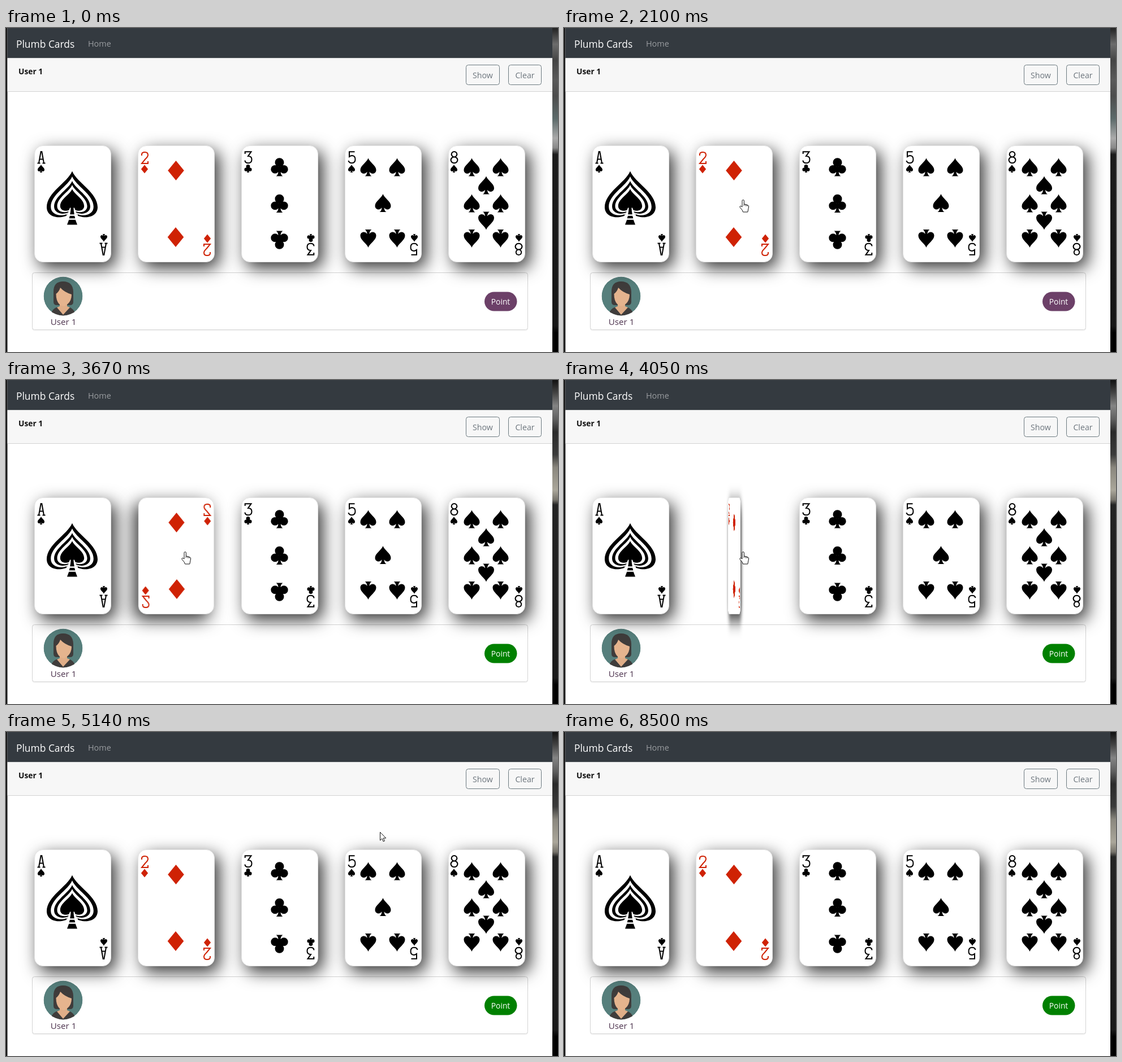
Write an HTML page that moves like this. It is 976x574 px and loops after 8.64 s.

```html
<!DOCTYPE html>
<html lang="en">
<head>
<meta charset="utf-8">
<title>Card estimates</title>
<style>
  html, body { margin: 0; width: 100%; height: 100%; overflow: hidden; background: #fff; }
  svg { position: absolute; left: 0; top: 0; overflow: visible; }
  #page, #pointer { width: 976px; height: 574px; }
  text { font-family: "Open Sans", "Noto Sans", sans-serif; }
  .card {
    position: absolute; top: 207.5px; width: 136px; height: 207px; box-sizing: border-box;
    border: 1.5px solid #e2e2e2; border-radius: 15px; background: #fff;
    box-shadow: 8px 10px 30px rgba(0, 0, 0, .8);
  }
  .card svg { left: -1px; top: -1.5px; width: 135px; height: 207px; }
  .rank { fill: none; stroke: currentColor; stroke-width: 2; }
  .outline { fill: none; stroke: #6c7a80; }
</style>
</head>
<body>
<svg id="page" viewBox="0 0 976 574">
  <defs>
    <linearGradient id="deskA" x2="0" y2="1">
      <stop offset="0" stop-color="#222"/><stop offset=".05" stop-color="#6c6c6c"/>
      <stop offset=".1" stop-color="#444"/><stop offset=".16" stop-color="#5a5a5a"/>
      <stop offset=".21" stop-color="#4c4c4c"/><stop offset=".28" stop-color="#5c6a6a"/>
      <stop offset=".34" stop-color="#aaa"/><stop offset=".37" stop-color="#888"/>
      <stop offset=".39" stop-color="#1c1c1c"/><stop offset=".92" stop-color="#161616"/>
      <stop offset=".94" stop-color="#000"/>
    </linearGradient>
    <linearGradient id="deskB" x2="0" y2="1">
      <stop offset="0" stop-color="#111"/><stop offset=".04" stop-color="#444"/>
      <stop offset=".08" stop-color="#848484"/><stop offset=".12" stop-color="#606060"/>
      <stop offset=".16" stop-color="#2a2a2a"/><stop offset=".23" stop-color="#3a3a3a"/>
      <stop offset=".27" stop-color="#8a877e"/><stop offset=".34" stop-color="#aaa69a"/>
      <stop offset=".37" stop-color="#77746c"/><stop offset=".385" stop-color="#242424"/>
      <stop offset=".92" stop-color="#191919"/><stop offset=".94" stop-color="#000"/>
    </linearGradient>
    <clipPath id="round"><circle cx="101" cy="475" r="34.5"/></clipPath>
  </defs>

  <rect width="976" height="574" fill="#161616"/>
  <rect x="966" width="10" height="574" fill="url(#deskA)"/>
  <rect id="desk" x="966" width="10" height="574" fill="url(#deskB)"/>
  <rect x="2.5" width="963.5" height="574" fill="#fff"/>
  <rect x="2.5" width="963.5" height="53.4" fill="#343a40"/>
  <rect x="2.5" y="53.4" width="963.5" height="58.6" fill="#f7f7f7"/>
  <rect x="2.5" y="112" width="963.5" height="1" fill="#d2d2d2"/>

  <text x="18" y="35" font-size="17.4" font-weight="500" fill="#fff">Plumb Cards</text>
  <text x="145" y="33" font-size="14.4" fill="#9a9da0">Home</text>
  <text x="22" y="82" font-size="13.8" font-weight="700" fill="#111">User 1</text>
  <g font-size="14.2" text-anchor="middle" fill="#6c757d">
    <rect class="outline" x="813.5" y="65.5" width="59" height="35" rx="4"/>
    <text x="843" y="89">Show</text>
    <rect class="outline" x="888.5" y="65.5" width="58" height="35" rx="4"/>
    <text x="917.5" y="89">Clear</text>
  </g>

  <rect x="46.5" y="435" width="876" height="101" rx="4" fill="none" stroke="#ececec"/>
  <rect x="46.5" y="433.5" width="876" height="101" rx="4" fill="#fff" stroke="#d3d3d3"/>
  <g clip-path="url(#round)">
    <circle cx="101" cy="475" r="34.5" fill="#567f7c"/>
    <path d="M84 485V467Q84 449 101 449T119 467V485Q119 491 113 491H90Q84 491 84 485Z" fill="#3f3c3b"/>
    <path d="M78 514Q79 497 92 494H110Q123 497 124 514Z" fill="#3f3c3b"/>
    <path d="M95 484H108V493L113 495 101 508 90 495 95 493Z" fill="#e0ae88"/>
    <path d="M88.5 471Q94 467 96 460 103 468 116 472 116 483 109 489 101 496 94 489 88.5 483 88.5 471Z" fill="#e5b48e"/>
  </g>
  <text x="101.5" y="525.5" font-size="15.2" font-weight="500" text-anchor="middle" fill="#4c324d">User 1</text>
  <rect id="point" x="846" y="467.5" width="57.5" height="34" rx="17" fill="#6c4068"/>
  <text x="874.5" y="490" font-size="13.8" font-weight="500" text-anchor="middle" fill="#fff">Point</text>
</svg>

<div id="cards"></div>

<svg id="pointer" viewBox="0 0 976 574">
  <path id="arrow" fill="#fff" stroke="#111" d="M.5.5V15L3.9 11.8 6.2 17 8.4 16 6.2 11H10.8Z"/>
  <path id="hand" fill="#fff" stroke="#111" stroke-linejoin="round"
    d="M5 13V2.2a1.7 1.7 0 0 1 3.4 0V8q4 .5 7 2 1.4.8 1.2 3L15.6 18 14.8 22H6.5L5 18.5 1 13.5q-.8-1.5.7-2 1.4-.2 3.3 1.5M8.4 8v3M11.5 9v2.5M14 9.8v2"/>
</svg>

<script>
const LOOP = 8640;
const $ = id => document.getElementById(id);

// ---- Cards ----
const SUITS = {
  spade: 'M0-16C2-9 14-3 14 5 14 12.5 5 13.5 2 8 2 12 4 15 6 16H-6C-4 15-2 12-2 8-5 13.5-14 12.5-14 5-14-3-2-9 0-16Z',
  club: 'M-8-8.3a8 8 0 1 1 16 0 8 8 0 1 1-16 0ZM-15.2 3.8a7.4 7.4 0 1 1 14.8 0 7.4 7.4 0 1 1-14.8 0Z'
    + 'M.4 3.8a7.4 7.4 0 1 1 14.8 0 7.4 7.4 0 1 1-14.8 0ZM-2-3H2V7C2 12 4 15 6 16H-6C-4 15-2 12-2 7Z',
  diamond: 'M0-17.5 14.3 0 0 17.5-14.3 0Z'
};
const RANKS = {
  A: 'M0 21.5H5M9 21.5H14M2.5 21.5 6.2 1H7.8L11.5 21.5M4 14.5H10',
  2: 'M1.5 7V5Q1.5 1 7 1T12.5 6Q12.5 9 8 13L1.5 21H12.5V17',
  3: 'M1.2 5V1.2H12L6.5 9Q13 9 13 15 13 21.3 7 21.3 1 21.3 1 16.5',
  5: 'M12 1.2H2.5V10Q5 8 7.5 8 13 8.5 13 14.5 13 21.2 7 21.2 2 21.2 1 17',
  8: 'M7 1a4.8 4.7 0 1 0 .01 0ZM7 10.4a5.9 5.4 0 1 0 .01 0Z'
};

const pip = (suit, x, y, flip = 1, size = 1) =>
  `<path fill="currentColor" d="${SUITS[suit]}" transform="translate(${x} ${y}) scale(${size * flip})"/>`;

function ace() {
  const body = 'M0-60C8-40 45-22 45 4 45 23 18 28 0 13-18 28-45 23-45 4-45-22-8-40 0-60Z';
  const rings = [1, .84, .71, .59, .47].map((s, i) =>
    `<path d="${body}" fill="${i % 2 ? '#fff' : '#000'}" transform="scale(${s})"/>`).join('');
  return `<g transform="translate(67 106.5)">${rings}
    <path d="M-4 5-11 24H11L4 5Z" fill="#fff"/><path d="M-2 0Q-3 22-9 35H9Q3 22 2 0Z"/>
    <path d="M-10 18H10M-10 25H10" stroke="#fff" stroke-width="2.5"/></g>`;
}

const pips = (suit, spots) => spots.map(([x, y, flip]) => pip(suit, x, y, flip)).join('');
const corners = [[41.5, 39.5], [92.5, 39.5], [41.5, 166, -1], [92.5, 166, -1]];
const deck = [
  ['A', 'spade', ace()],
  [2, 'diamond', pips('diamond', [[67.5, 44.5], [67, 162.5]])],
  [3, 'club', pips('club', [[67.5, 39.5], [67.5, 104], [67.5, 168.5, -1]])],
  [5, 'spade', pips('spade', [...corners, [67.5, 103]])],
  [8, 'spade', pips('spade', [...corners, [41.5, 103.5], [92.5, 103.5], [67, 71.5], [67, 134.5, -1]])]
];

$('cards').innerHTML = deck.map(([rank, suit, art], i) => {
  const shift = rank === 8 ? 3.5 : 5.5;
  const index = `<path class="rank" d="${RANKS[rank]}" transform="translate(${shift} 11)"/>`
    + pip(suit, shift + 6.5, 42, 1, .43);
  return `<div class="card" style="left:${50 + 183.1 * i}px;color:${suit === 'diamond' ? '#cf2204' : '#000'}">
    <svg viewBox="0 0 135 207">${index}<g transform="rotate(180 67.5 103.5)">${index}</g>${art}</svg></div>`;
}).join('');

// ---- Motion: rows of [ms, style], each held until the next ----
const animations = [];
function play(el, rows) {
  const frames = rows.map(([ms, style]) => ({ offset: ms / LOOP, easing: 'step-end', ...style }));
  frames.push({ ...frames[frames.length - 1], offset: 1 });
  animations.push(el.animate(frames, { duration: LOOP, iterations: Infinity }));
}

// The standard CSS "ease" curve
function ease(x) {
  if (x >= 1) return 1;
  let low = 0, high = 1;
  for (let i = 0; i < 30; i++) {
    const u = (low + high) / 2;
    if (.75 * u - .75 * u * u + u ** 3 < x) low = u; else high = u;
  }
  return .3 * low + 2.4 * low ** 2 - 1.7 * low ** 3;
}

const FLIP_START = 3092, TICK = 77.7;
const ticks = Array.from({ length: 27 }, (_, i) => 3110 + i * TICK);
const during = (rest, length, styleAt) =>
  [[0, rest], ...ticks.map(ms => [ms - 8, styleAt(ease((ms - FLIP_START) / length))])];

play(document.querySelectorAll('.card')[1], during({ transform: 'scaleX(1)' }, 2000,
  p => ({ transform: `scaleX(${Math.cos(p * 2 * Math.PI).toFixed(4)})` })));

const purple = [108, 64, 104], green = [0, 128, 0];
const blend = p => ({ fill: `rgb(${purple.map((c, i) => Math.round(c + (green[i] - c) * p))})` });
play($('point'), during(blend(0), 500, blend));

play($('desk'), [[0, { opacity: 0 }], [2960, { opacity: 1 }]]);

// ms, x, y, shape
const path = [
  [0, 0, 0, ''],
  [380, 834, 550, 'arrow'], [460, 745, 478, 'arrow'], [540, 671, 418, 'arrow'],
  [780, 430, 378, 'hand'], [860, 231, 348, 'hand'],
  [1100, 192, 337, 'arrow'], [1180, 157, 326, 'hand'], [1250, 176, 317, 'hand'], [1330, 237, 310, 'hand'],
  [1400, 292, 307, 'hand'], [1480, 330, 303, 'hand'], [1550, 343, 306, 'hand'],
  [1720, 340, 307, 'hand'], [1800, 334, 307, 'hand'], [1870, 327, 307, 'hand'],
  [1950, 320, 306, 'hand'], [2020, 314, 305, 'hand'], [2100, 310, 304, 'hand'],
  [4590, 340, 294, 'hand'], [4670, 398, 273, 'arrow'], [4745, 469, 245, 'hand'], [4820, 652, 181, 'arrow'],
  [4910, 654, 180, 'arrow'], [4990, 657, 178, 'arrow'], [5060, 659, 177, 'arrow'], [5140, 661, 177, 'arrow'],
  [5220, 672, 175, 'arrow'], [5300, 690, 173, 'arrow'], [5370, 708, 172, 'arrow'], [5450, 723, 172, 'arrow'],
  [5920, 725, 174, 'arrow'], [6000, 729, 177, 'arrow'], [6080, 734, 180, 'arrow'], [6160, 739, 183, 'arrow'],
  [6400, 752, 203, 'arrow'], [6480, 772, 231, 'arrow'],
  [6710, 800, 275, 'hand'], [6790, 852, 337, 'hand'], [6860, 902, 401, 'hand'],
  [7020, 915, 440, 'arrow'], [7100, 932, 498, 'arrow'], [7170, 946, 549, 'arrow'],
  [7400, 948, 556, 'arrow'], [7480, 951, 566, 'arrow'], [7560, 0, 0, '']
];
for (const shape of ['arrow', 'hand']) {
  play($(shape), path.map(([ms, x, y, kind]) =>
    [ms, { transform: `translate(${x}px, ${y}px)`, opacity: kind === shape ? 1 : 0 }]));
}

const start = document.timeline.currentTime ?? 0;
animations.forEach(a => { a.startTime = start; });
</script>
</body>
</html>
```
